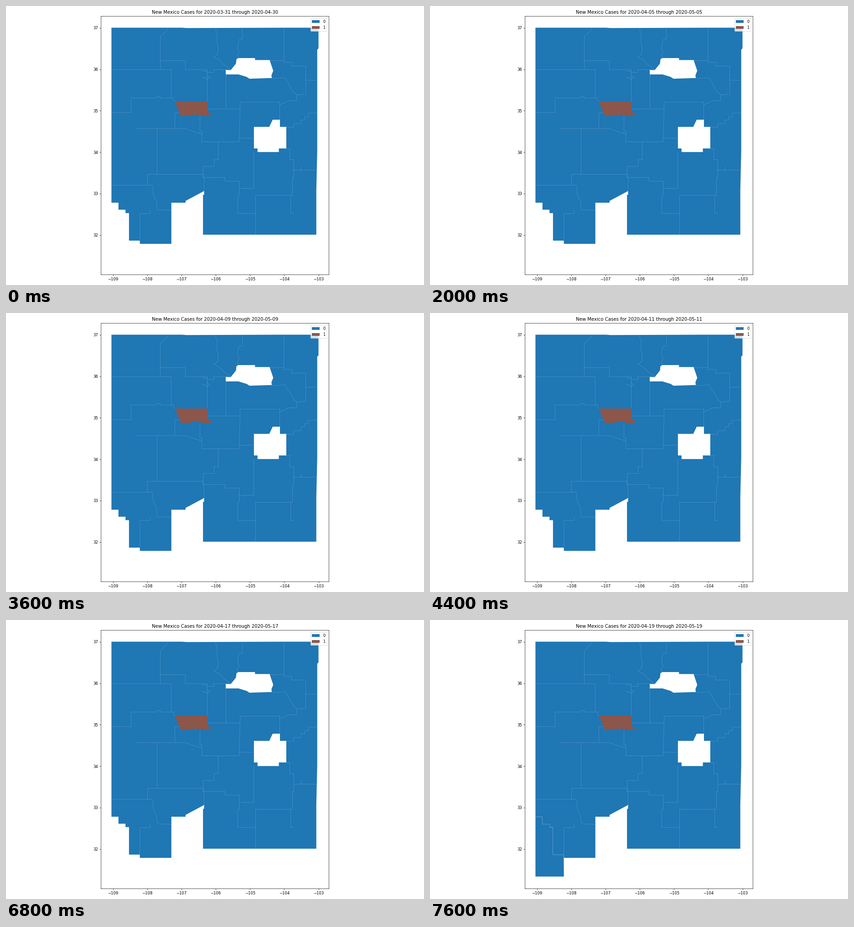
Write a matplotlib script that moves like this. It is 917 px wide and 611 px high and loops after 8000 ms.

```python
import numpy as np
import matplotlib.pyplot as plt
from matplotlib.animation import FuncAnimation
from matplotlib.collections import LineCollection
from matplotlib.patches import Patch, Polygon

W, H, DPI = 917, 611, 61.1
BLUE, BROWN = "#1f77b4", "#8c564b"
LEFT, RIGHT, TOP, BOTTOM = 208.25, 708.25, 22, 588
DAYS, INTERVAL, HIDALGO_DAY = 20, 400, 18
START = np.datetime64("2020-03-31")

plt.rcParams["font.family"] = "DejaVu Sans"
fig = plt.figure(figsize=((W + 0.01) / DPI, (H + 0.01) / DPI), dpi=DPI,
                 facecolor="white")
ax = fig.add_axes([LEFT / W, 1 - BOTTOM / H, (RIGHT - LEFT) / W, (BOTTOM - TOP) / H])

# Axes units are stage pixels; ticks convert degrees to pixels.
ax.set_xlim(LEFT, RIGHT)
ax.set_ylim(BOTTOM, TOP)
lons, lats = np.arange(-109, -102), np.arange(32, 38)
ax.set_xticks(234.9 + 75.1 * (lons + 109), [f"\u2212{-lon}" for lon in lons])
ax.set_yticks(47.75 + 90.76 * (37 - lats), [str(lat) for lat in lats])


def to_pixels(points):
    """Counties follow the survey grid: six-mile ranges (east) and townships (north)."""
    east, north = np.array(points, float).T
    return np.column_stack([393.9 + 7.8 * east + 0.0028 * east**2,
                            296.2 - 7.87 * north])


def stairs(x, y, *turns):
    """Walk the grid, alternately to a new x and a new y."""
    path = [(x, y)]
    for i, turn in enumerate(turns):
        x, y = (x, turn) if i % 2 else (turn, y)
        path.append((x, y))
    return path


def ridge(start, end, seed, bends=7, rough=0.35):
    """An uneven natural border running roughly north to south."""
    path = np.linspace(start, end, bends + 2)
    path[1:-1, 0] += np.random.default_rng(seed).uniform(-rough, rough, bends)
    return path.tolist()


def area(points, color, zorder=1):
    return ax.add_patch(Polygon(to_pixels(points), facecolor=color,
                                linewidth=0, zorder=zorder))


def seams(*paths):
    """Faint light lines, each filling the pixels that hold a shared border."""
    nudge = (-0.5, 0.5)
    return ax.add_collection(LineCollection(
        [to_pixels(path) + nudge for path in paths], colors="white", alpha=0.16,
        linewidths=72 / DPI, snap=True, zorder=1.5), autolim=False)


hidalgo_edge = stairs(-21, -17.1, -19, -19.05, -17, -20, -16, -27.65, -12.95)
state = [(-21, 31.6), (-1, 31.6), (0.3, 31.5), (27.4, 31.6), (36.9, 31.6),
         (36.9, 25.8), (36.55, 25.5), (36.55, -2.8), (36.3, -13.8)]
state += stairs(36.3, -26, 4.9, -14.9, 5.2, -13.85)
state += stairs(0, -16.6, 0, -17.1, -4, -28.55, -12.9) + hidalgo_edge[::-1]
area(state, BLUE)

# Two counties without data, then the one with cases.
area([(11.25, 19.85), (12.65, 19.8), (14.1, 21.6), (14.25, 22.85), (14.8, 23.15),
      (19.4, 23.15), (19.4, 22.6), (23.45, 22.6), (24.45, 19.6), (23.95, 18.4),
      (24.05, 17.6), (17.85, 17.4), (17.1, 17.9), (14.8, 18.6), (11.25, 18.6)],
     "white")
area([(23.35, 4), (24.3, 6)]
     + stairs(26.3, 6, 26.3, 4, 28.05, -2, 26, -3, 20.1, -2, 19.1, 4), "white")
area(stairs(-2.95, 11.05, 6.15, 7.95, 7.05, 7.05, 4.5)
     + [(4.3, 7.3), (1.8, 7.4), (1.5, 7.05), (-1.35, 7.05)], BROWN, zorder=1.6)

# Northwest
seams([(-5, 31.5), (-5.4, 30.8), (-7.1, 29.2), (-7.1, 20.05)],
      stairs(-7.1, 22.6, 0, 20.05, 6.1, 11),
      stairs(-21, 20.05, -4.05, 12.1),
      stairs(-21, 8.1, -15.35, 12.1, -8.2, 12.6, -7.1, 12.1, -3.5)
      + [(-2.95, 11.05)])
# North centre
seams(stairs(4.7, 19.6, 6.1),
      [(4.6, 18), (6.1, 17.4), (6.8, 17.9), (6.1, 18.3)],
      stairs(6.1, 19.3, 7.9, 20.05, 11.25), stairs(11.25, 18.6, 11.25, 9.1),
      ridge((8.4, 31.5), (9, 24.4), seed=4, bends=3)
      + [(7.95, 23.5), (9.5, 22.7), (10.5, 21.6), (12.6, 20)],
      stairs(15.9, 31.5, 15.9, 28.5, 15.1)
      + ridge((14.7, 27.6), (14.8, 23.2), seed=2, bends=4))
# Northeast
seams(stairs(23.4, 22.6, 27.4),
      stairs(27.4, 31.5, 27.4, 22.1, 29.5, 21.1, 33.4, 13.2)
      + [(30.95, 13.1), (30.3, 13.6), (27.8, 17.7), (24, 17.6)],
      stairs(33.4, 17.1, 36.5),
      stairs(6.1, 9.1, 15.25, 11.05, 26.3, 6),
      [(26.3, 10.3), (28.7, 11.4), (30.95, 11.4), (30.95, 13.1)],
      stairs(28.05, 4, 30.15, 5, 32.15, 6, 33.15, 7, 34.15, 8, 36.5))
# Centre
seams([(15.25, 9.1), (15.05, 1)],
      stairs(4, 7, 4, 3, 4.5, 0, 15.05, 1, 19.1),
      stairs(-1.9, 8.1, -3, 3.7),
      stairs(-14.2, 3.7, 0) + [(1.8, 3), (4.5, 2.15)],
      stairs(-8, 3.7, -8, -9),
      stairs(9.2, 0, 9.2, -5, 8, -6.9, 4.9, -10, 11.1, -11, 15.05, -13,
             19, -11.3) + [(19.1, -3)])
# South
seams(stairs(-10.7, -12.1, -10.7, -9, 4.9, -10),
      stairs(-21, -12.1, -9.4)
      + ridge((-9.2, -13), (-7.9, -19), seed=3, bends=4) + [(-4, -19.1)],
      stairs(-12.9, -27.6, -12.9, -20, -10, -19.1),
      stairs(5.2, -10, 5.2, -13.9),
      stairs(15.05, -13, 15.05, -14.9, 14.65, -20, 19.5),
      stairs(19.5, -26, 19.5, -14.9, 29.7, -10, 30.1, -5, 29, -2, 28.05),
      stairs(29.25, -14.9, 29.25, -20, 30.1),
      stairs(30.1, -7.9, 36.4), stairs(32.15, -6.9, 32.15, -7.9))

hidalgo = [area(hidalgo_edge + stairs(-12.9, -33.75, -21), BLUE),
           seams(hidalgo_edge)]

ax.legend(handles=[Patch(facecolor=color, linewidth=0, label=label)
                   for color, label in ((BLUE, "0"), (BROWN, "1"))],
          loc="upper right")
title = ax.set_title("")


def update(day):
    first = START + day
    title.set_text(f"New Mexico Cases for {first} through {first + 30}")
    for artist in hidalgo:
        artist.set_visible(day >= HIDALGO_DAY)
    return [title, *hidalgo]


anim = FuncAnimation(fig, update, frames=DAYS, interval=INTERVAL,
                     repeat=True, repeat_delay=0)
plt.show()
```
